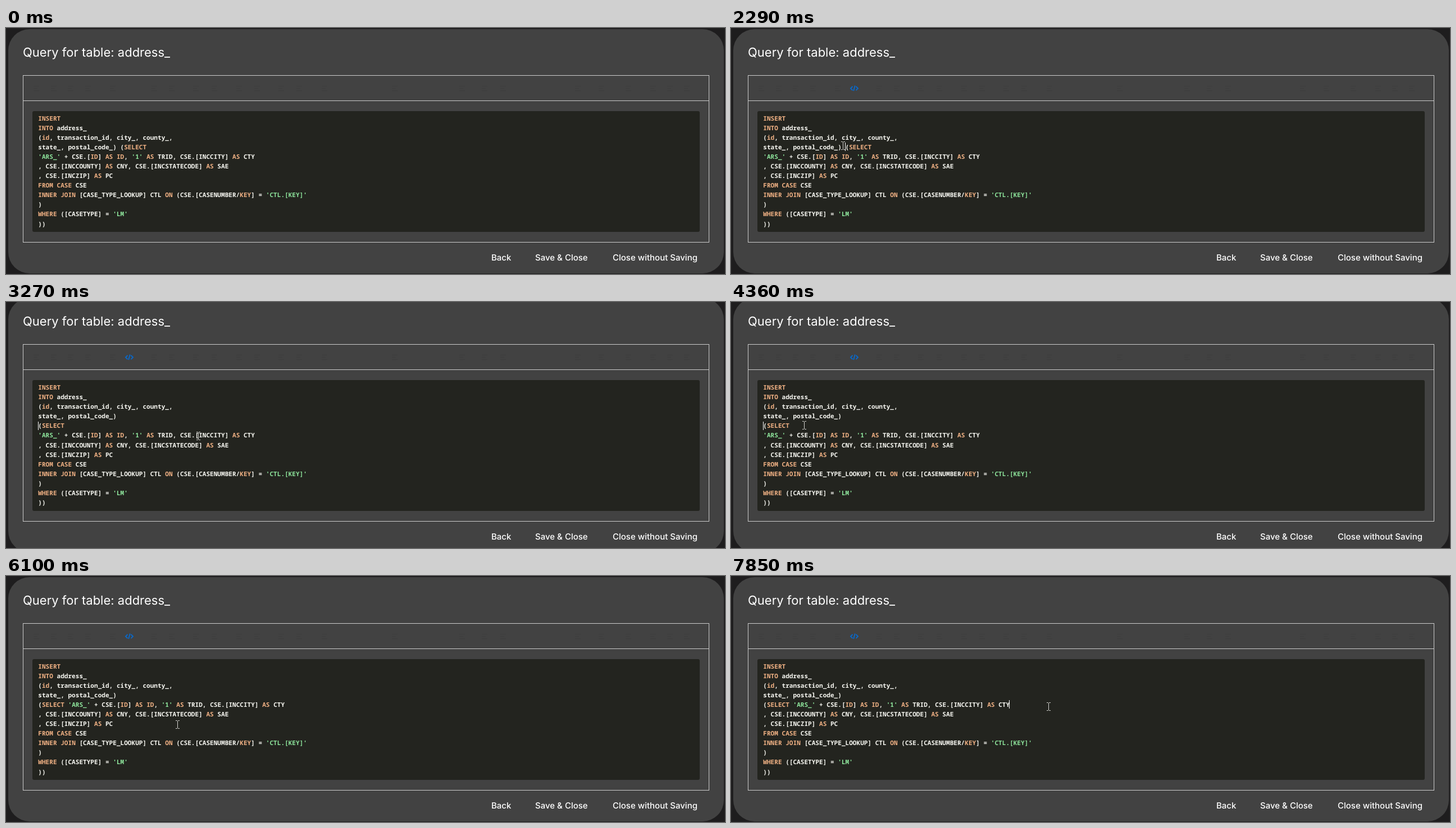
These frames come from a looping animation (1280x438 px, 8 s). An HTML page:

```html
<!DOCTYPE html>
<html lang="en">
<head>
<meta charset="utf-8">
<title>Query editor</title>
<style>
html, body { margin: 0; width: 100%; height: 100%; overflow: hidden; }
body { background: #1e1d1e; }

/* --grow is the height of the extra code line */
.stage {
  --grow: 0px;
  --shift: calc(var(--grow) / -2);
  position: relative; width: 1280px; height: 438px; overflow: hidden;
  text-rendering: geometricPrecision;
  animation: grow 8s -5ms step-end infinite;
}
.stage > * { position: absolute; box-sizing: border-box; }

.panel {
  left: 4px; top: calc(2px + var(--shift));
  width: 1274px; height: calc(435px + var(--grow));
  border-radius: 38px; background: #424242;
}
h1, .button { margin: 0; color: #fff; font-family: Inter, "Open Sans", sans-serif; white-space: nowrap; }
h1 { left: 30px; top: calc(30px + var(--shift)); font-size: 22px; font-weight: 400; line-height: 28px; }
.button { top: calc(399px - var(--shift)); font-size: 15px; font-weight: 500; line-height: 20px; }

.frame {
  left: 30px; top: calc(84px + var(--shift));
  width: 1222px; height: calc(298px + var(--grow));
  border: 1px solid #ccc;
}
.tools {
  left: 30px; top: calc(84px + var(--shift));
  width: 1222px; height: 45.5px;
  border-bottom: 1px solid #ccc;
}
.tools svg { position: absolute; left: -30px; top: -84px; fill: none; }
.faint { stroke: #3e3e3e; stroke-width: 1.4; }
.tag { stroke: #0a68c8; stroke-width: 1.9; visibility: hidden; animation: tag 8s -5ms step-end infinite; }

.code {
  left: 47px; top: calc(147.5px + var(--shift));
  width: 1188px; height: calc(215.5px + var(--grow));
  border-radius: 3px; background: #23241f;
}
pre {
  position: absolute; left: 10.3px; top: 5px; margin: 0;
  color: #f8f8f2; visibility: hidden;
  font: 600 11.08px/17.1px "Noto Sans Mono", "DejaVu Sans Mono", monospace;
  font-variant-ligatures: none;
}
pre b { font-weight: inherit; color: #f0b184; }
pre i { font-style: normal; color: #8ee59c; }
#first { animation: first 8s -5ms step-end infinite; }
#split { animation: split 8s -5ms step-end infinite; }
#joined { animation: joined 8s -5ms step-end infinite; }

.caret { left: 0; top: 0; width: 1px; height: 15px; background: #fff; opacity: 0; animation: caret 8s -5ms step-end infinite; }
.pointer { left: -4px; top: -7px; opacity: 0; fill: none; stroke: #d4d4d0; animation: show 8s -5ms step-end infinite, move 8s -5ms steps(1) infinite; }

@keyframes grow { 0%, 76.25% { --grow: 0px; } 40.875% { --grow: 17.1px; } }
@keyframes tag { 27.625%, 100% { visibility: visible; } }
@keyframes first { 0% { visibility: visible; } 40.875%, 100% { visibility: hidden; } }
@keyframes split { 40.875% { visibility: visible; } 76.25%, 100% { visibility: hidden; } }
@keyframes joined { 76.25%, 100% { visibility: visible; } }
@keyframes show { 4.375%, 100% { opacity: 1; } }

@keyframes caret {
  0%      { opacity: 0; transform: translate(203px, 204px); }
  27.625% { opacity: 1; transform: translate(203px, 204px); }
  32.625% { opacity: 0; transform: translate(203px, 204px); }
  35.25%  { opacity: 1; transform: translate(203px, 204px); }
  39.375% { opacity: 0; transform: translate(203px, 204px); }
  40.875% { opacity: 1; transform: translate(57px, 213px); }
  46.25%  { opacity: 0; transform: translate(57px, 213px); }
  52.5%   { opacity: 1; transform: translate(57px, 213px); }
  58.75%  { opacity: 1; transform: translate(103px, 213px); }
  65.625% { opacity: 0; transform: translate(103px, 213px); }
  68.25%  { opacity: 1; transform: translate(110px, 213px); }
  75.125% { opacity: 0; transform: translate(110px, 213px); }
  82%     { opacity: 1; transform: translate(110px, 221px); }
  88.25%  { opacity: 0; transform: translate(110px, 221px); }
  95.375% { opacity: 1; transform: translate(110px, 221px); }
  96.75%, 100% { opacity: 1; transform: translate(495px, 221px); }
}

/* stepped like a screen recording, about ten positions a second */
@keyframes move {
  0%, 4.375% { transform: translate(1007px, 234px); animation-timing-function: steps(3); }
  8.25%   { transform: translate(760px, 290px); animation-timing-function: steps(4); }
  13.5%   { transform: translate(452px, 256px); }
  15%     { transform: translate(405px, 245px); animation-timing-function: steps(4); }
  20.25%  { transform: translate(271px, 204px); }
  21.75%  { transform: translate(235px, 194px); animation-timing-function: steps(2); }
  24.375% { transform: translate(205px, 209px); }
  25.5%   { transform: translate(202px, 208px); }
  27.625% { transform: translate(199px, 209px); animation-timing-function: steps(4); }
  32.625% { transform: translate(342px, 238px); }
  46.25%  { transform: translate(349px, 234px); animation-timing-function: steps(2); }
  49.125% { transform: translate(280px, 200px); animation-timing-function: steps(2); }
  51.625% { transform: translate(180px, 184px); animation-timing-function: steps(2); }
  54.5%   { transform: translate(130px, 219px); }
  56.125% { transform: translate(128px, 219px); }
  57.25%  { transform: translate(135px, 220px); animation-timing-function: steps(3); }
  61.375% { transform: translate(295px, 261px); }
  68.25%  { transform: translate(305px, 264px); }
  84.625% { transform: translate(310px, 267px); animation-timing-function: steps(3); }
  88.75%  { transform: translate(430px, 255px); animation-timing-function: steps(3); }
  92.75%  { transform: translate(560px, 230px); }
  95.375% { transform: translate(570px, 235px); }
  96.75%  { transform: translate(567px, 233px); }
  98.125%, 100% { transform: translate(565px, 232px); }
}
</style>
</head>
<body>
<div class="stage">
  <div class="panel"></div>
  <h1>Query for table: address_</h1>
  <div class="tools">
    <svg width="1280" height="140">
      <path class="faint" id="icons"/>
      <path class="tag" d="M216.5 104l-3.5 3.5 3.5 3.5M222.5 104l3.5 3.5-3.5 3.5M220.8 102.5l-2.6 9.5"/>
    </svg>
  </div>
  <div class="frame"></div>
  <div class="code"><pre id="first"></pre><pre id="split"></pre><pre id="joined"></pre></div>
  <div class="button" style="left:864px">Back</div>
  <div class="button" style="left:942px">Save &amp; Close</div>
  <div class="button" style="left:1080px">Close without Saving</div>
  <div class="caret"></div>
  <svg class="pointer" width="8" height="15"><path d="M1 .5h2.5l1 1 1-1H8M4.5 1v13M1 14.5h2.5l1-1 1 1H8"/></svg>
</div>
<script>
const words = /('[^']*')|\b(INSERT|INTO|id|ID|SELECT|AS|FROM|CASE|INNER|JOIN|ON|KEY|WHERE)\b/g;
const paint = sql => sql.replace(words, (all, text) => text ? `<i>${all}</i>` : `<b>${all}</b>`);

const query = (before, after) => `INSERT
INTO address_
(id, transaction_id, city_, county_,
state_, postal_code_)${before}(SELECT${after}'ARS_' + CSE.[ID] AS ID, '1' AS TRID, CSE.[INCCITY] AS CTY
, CSE.[INCCOUNTY] AS CNY, CSE.[INCSTATECODE] AS SAE
, CSE.[INCZIP] AS PC
FROM CASE CSE
INNER JOIN [CASE_TYPE_LOOKUP] CTL ON (CSE.[CASENUMBER/KEY] = 'CTL.[KEY]'
)
WHERE ([CASETYPE] = 'LM'
))`;

const fill = (id, before, after) => {
  document.getElementById(id).innerHTML = paint(query(before, after));
};
fill('first', ' ', '\n');
fill('split', '\n', '\n');
fill('joined', '\n', ' ');

// barely visible toolbar buttons
const spots = [54, 85, 115, 146, 190, 264, 295, 338, 371, 415, 447, 490, 522, 567,
  692, 812, 852, 885, 1018, 1060, 1108, 1152, 1182, 1212];
document.getElementById('icons').setAttribute('d',
  spots.map(x => `M${x - 5} 103.5h10m-10 4h7m-7 4h10`).join(''));
</script>
</body>
</html>
```
